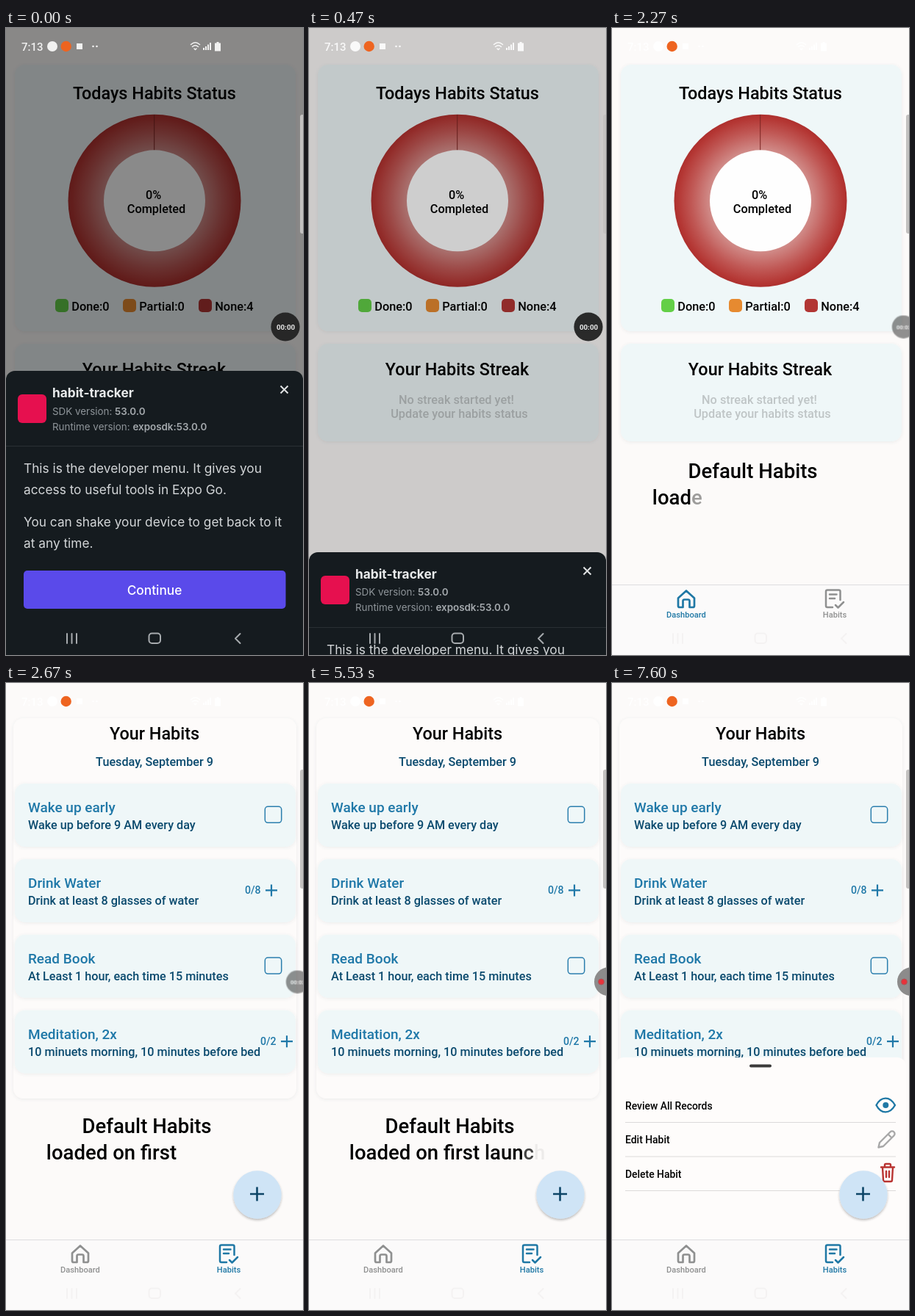
These frames come from a looping animation (404 by 854 pixels, 8 s). An HTML page:

```html
<!DOCTYPE html>
<html lang="en">
<head>
<meta charset="utf-8">
<title>Habit tracker walkthrough</title>
<style>
  html, body { margin: 0; width: 100%; height: 100%; overflow: hidden; background: #fcfaf9; }
  svg { display: block; width: 100%; height: 100%; }
  text { font-family: Roboto, Arial, sans-serif; font-weight: 500; white-space: pre; }
  .mid { text-anchor: middle; }
  .h { font-size: 23.4px; }
  .b { font-size: 16.3px; }
  .cap { font-size: 27.5px; }
  .tab { font-size: 11.1px; text-anchor: middle; fill: currentColor; }
  .opt { font-size: 13.9px; }
  .line { fill: none; stroke: currentColor; stroke-linecap: round; stroke-linejoin: round; }
  .card { fill: #eff7f8; filter: url(#soft); }
  .on { color: #1f78a5; }
  .off { color: #8f9090; }
  .title { font-size: 19px; fill: #1f78a8; }
  .sub { font-size: 16.2px; fill: #0a4a6e; }
  .count { font-size: 14.1px; fill: #1f78a8; }
  #dev text { font-family: Inter, Arial, sans-serif; font-size: 17.3px; font-weight: 400; fill: #d3d6d8; }
  #dev .meta { font-size: 13.4px; fill: #8f959a; }
  #dev .meta tspan { font-weight: 600; fill: #a4a9ad; }

  #dev, #dim, #nav, #menu, #bubble, .touch { animation: 8s linear infinite; }
  #dev { animation-name: dismiss; }
  #dim { animation-name: undim; }
  #nav { animation-name: navfade; }
  #menu { animation-name: rise; }
  #bubble { animation-name: dock; transform-origin: 380px 407px; }
  #tap { animation-name: tap; }
  #hold { animation-name: hold; }

  @keyframes dismiss {
    0%, 3.8% { transform: none; }
    4.125% { transform: translateY(16px); }
    5% { transform: translateY(117.500px); }
    5.875% { transform: translateY(245px); }
    6.625% { transform: translateY(363.500px); }
    7.1%, 100% { transform: translateY(400px); }
  }
  @keyframes undim {
    0%, 3.8% { opacity: .46; }
    5% { opacity: .35; }
    5.875% { opacity: .19; }
    6.625% { opacity: .03; }
    7.5%, 100% { opacity: 0; }
  }
  @keyframes navfade {
    0%, 6.2% { color: #a7abae; }
    6.7% { color: #b9babb; }
    10.8%, 100% { color: #f4f2f2; }
  }
  @keyframes rise {
    0%, 85.6% { transform: translateY(250px); animation-timing-function: cubic-bezier(.2, .7, .3, 1); }
    90.8%, 100% { transform: none; }
  }
  @keyframes dock {
    0%, 17.5% { transform: none; opacity: .97; }
    20%, 100% { transform: translateX(16.5px) scale(.8); opacity: .5; }
  }
  @keyframes tap {
    0%, 2.4% { opacity: 0; }
    3.3%, 5.1% { opacity: .85; }
    5.8%, 100% { opacity: 0; }
  }
  @keyframes hold {
    0%, 82% { opacity: 0; }
    84%, 85.8% { opacity: .6; }
    86.6%, 100% { opacity: 0; }
  }
</style>
</head>
<body>
<svg viewBox="0 0 404 854">
  <defs>
    <radialGradient id="ring" gradientUnits="userSpaceOnUse" cx="202" cy="235.3" r="117.5">
      <stop offset=".58" stop-color="#d18d8a"/>
      <stop offset=".8" stop-color="#c05855"/>
      <stop offset=".96" stop-color="#b43633"/>
      <stop offset="1" stop-color="#ad302e"/>
    </radialGradient>
    <filter id="soft" x="-10%" y="-10%" width="120%" height="125%">
      <feDropShadow dx="0" dy="1" stdDeviation="2" flood-color="#54606a" flood-opacity=".1"/>
    </filter>
    <filter id="lift" x="-20%" y="-20%" width="140%" height="150%">
      <feDropShadow dx="0" dy="2" stdDeviation="1.6" flood-color="#333" flood-opacity=".3"/>
    </filter>
    <g id="home">
      <path class="line" stroke-width="2.7" d="M90 776.5L101 766.5L112 776.5V787a2 2 0 0 1-2 2H105.5V780.5a2 2 0 0 0-2-2h-5a2 2 0 0 0-2 2V789H92a2 2 0 0 1-2-2Z"/>
      <text class="tab" x="101" y="803">Dashboard</text>
    </g>
    <g id="list">
      <path class="line" stroke-width="2.5" d="M300 789H293a2 2 0 0 1-2-2V767.5a2 2 0 0 1 2-2H308.5a2 2 0 0 1 2 2V779M296 771.5H305.5M296 777H303M304 786L307.5 789.5L315 782"/>
      <text class="tab" x="303" y="803">Habits</text>
    </g>
  </defs>

  <rect width="404" height="854" fill="#fcfaf9"/>

  <g id="dash">
    <rect class="card" x="12" y="50" width="382" height="363" rx="14"/>
    <rect class="card" x="12" y="430" width="382" height="133" rx="14"/>
    <text class="h mid" x="202" y="97">Todays Habits Status</text>
    <circle cx="202" cy="235.3" r="117.5" fill="url(#ring)"/>
    <path d="M201.7 118V167" stroke="#7d2523"/>
    <circle cx="202" cy="235.3" r="69" fill="#fefefe"/>
    <text class="b mid" x="200.5" y="233">0%</text>
    <text class="b mid" x="204.5" y="252">Completed</text>
    <g id="legend"></g>
    <text class="h mid" x="201.5" y="473">Your Habits Streak</text>
    <g fill="#bfc5c6">
      <text class="b mid" x="200.5" y="511.5">No streak started yet!</text>
      <text class="b mid" x="204.5" y="530.5">Update your habits status</text>
    </g>
  </g>

  <g id="habits">
    <rect x="10" y="48" width="385" height="518" rx="14" fill="#fdfbfa" filter="url(#soft)"/>
    <text class="h mid" x="202" y="77">Your Habits</text>
    <text class="sub mid" x="202" y="112.5">Tuesday, September 9</text>
    <g id="rows"></g>
  </g>

  <text class="cap mid" x="191.5" y="612.5"></text>
  <text class="cap mid" x="188" y="648.5"></text>

  <g id="menu">
    <path d="M4 770V522a12 12 0 0 1 12-12H388a12 12 0 0 1 12 12V770Z" fill="#fefcfb"/>
    <rect x="187" y="519.5" width="30" height="4" rx="2" fill="#3a3a3a"/>
    <path d="M18 598.5H386M18 645H386M18 691.5H386" stroke="#dcdada"/>
    <text class="opt" x="18" y="580.5">Review All Records</text>
    <text class="opt" x="18" y="627">Edit Habit</text>
    <text class="opt" x="18" y="673.5">Delete Habit</text>
    <g class="on">
      <path class="line" stroke-width="2.4" d="M359.5 575C366 562.5 378 562.5 385 575C378 587.5 366 587.5 359.5 575Z"/>
      <circle cx="372.3" cy="575" r="4" fill="currentColor"/>
    </g>
    <path class="line" color="#a8a8a8" stroke-width="2.4" d="M362.5 632.5L364 626L378.5 611.5a3.5 3.5 0 0 1 5 5L369 631ZM375.5 614.5L380.5 619.5"/>
    <path class="line" color="#b93432" stroke-width="2.4" d="M366 659.5H384M371 659.5V656.5a1.5 1.5 0 0 1 1.5-1.5h5a1.5 1.5 0 0 1 1.5 1.5V659.5M368 660L369 677a2 2 0 0 0 2 2H379a2 2 0 0 0 2-2L382 660M373 665V673M377 665V673"/>
  </g>

  <g id="fab">
    <circle cx="342" cy="697" r="32.7" fill="#cfe4f6" filter="url(#lift)"/>
    <path d="M332 696H351M341.5 686.5V705.5" stroke="#0d4567" stroke-width="2.6"/>
  </g>

  <rect y="758" width="404" height="96" fill="#fbfafa"/>
  <path d="M0 758.5H404" stroke="#dddde0"/>
  <g id="tabA"><use href="#home" class="on"/><use href="#list" class="off"/></g>
  <g id="tabB"><use href="#home" class="off"/><use href="#list" class="on"/></g>

  <rect id="dim" width="404" height="854"/>

  <g id="dev">
    <path d="M0 860V479a12 12 0 0 1 12-12H392a12 12 0 0 1 12 12V860Z" fill="#151b1f"/>
    <path d="M0 569.5H404" stroke="#2b3135"/>
    <rect x="16" y="499" width="39" height="39" rx="6" fill="#e6104f"/>
    <text x="63" y="503" style="font-weight:700;fill:#e9ebec">habit-tracker</text>
    <text class="meta" x="63" y="526.5">SDK version: <tspan>53.0.0</tspan></text>
    <text class="meta" x="63" y="547.5">Runtime version: <tspan>exposdk:53.0.0</tspan></text>
    <path d="M373.5 487.5L383.5 497.5M383.5 487.5L373.5 497.5" stroke="#dfe1e2" stroke-width="2"/>
    <text x="24" y="606">This is the developer menu. It gives you</text>
    <text x="24" y="634.5">access to useful tools in Expo Go.</text>
    <text x="24" y="679">You can shake your device to get back to it</text>
    <text x="24" y="707.5">at any time.</text>
    <rect x="24" y="739" width="356.5" height="52" rx="5" fill="#5a4aea"/>
    <text class="mid" x="202" y="771.5" style="font-weight:500;fill:#fff">Continue</text>
  </g>

  <path id="nav" class="line" stroke-width="2" d="M83 825V838M89.5 825V838M96 825V838M199 824.5h7a4 4 0 0 1 4 4v5.5a4 4 0 0 1-4 4h-7.5a4 4 0 0 1-4-4v-5.5a4 4 0 0 1 4-4ZM318.5 825L312 831.5L318.5 838"/>

  <g fill="#fff" opacity=".88">
    <text x="21" y="30.5" font-size="15">7:13</text>
    <circle cx="63" cy="25" r="7"/>
    <rect x="96" y="21" width="8" height="8"/>
    <circle cx="118.5" cy="25" r="1.3"/>
    <circle cx="123.5" cy="25" r="1.3"/>
    <path class="line" color="#fff" stroke-width="1.5" d="M251.5 22.5Q257.5 17 263.5 22.5M253.5 25.5Q257.5 22 261.5 25.5M256 28L257.5 29.5L259 28"/>
    <path d="M268 30V27h2V30ZM271 30V25h2V30ZM274 30V22.5h2V30ZM277 30V20h2V30ZM284 20.5h2.5V19h3V20.5H292V31.5H284Z"/>
  </g>
  <circle cx="81.7" cy="25" r="7.2" fill="#ee6420"/>

  <path d="M404 118h-1a3 3 0 0 0-3 3V277a3 3 0 0 0 3 3h1Z" fill="#c3c1c0"/>

  <g id="timer">
    <g id="bubble">
      <circle cx="380" cy="407" r="19.6" fill="#252525"/>
      <g id="clock"></g>
    </g>
  </g>
  <g id="rec">
    <circle cx="407.5" cy="406.8" r="19.5" fill="#8c8b8b"/>
    <circle cx="397.5" cy="407" r="4" fill="#e8323a" stroke="#a5595c"/>
  </g>

  <circle id="tap" class="touch" cx="383.5" cy="499" r="10" fill="#d3d5d6" stroke="#bfc1c2"/>
  <circle id="hold" class="touch" cx="80.5" cy="487.5" r="12" fill="#d9dcdd" stroke="#c3c6c7"/>
</svg>

<script>
  const LOOP = 8000, SWAP = 2670, STOP = 4400;
  const $ = id => document.getElementById(id);

  // points: [ms, value] pairs, each ms used once
  function fade(el, prop, points, easing = 'linear') {
    const frames = points.map(([ms, v]) => ({ [prop]: v, offset: ms / LOOP, easing }));
    el.animate(frames, { duration: LOOP, iterations: Infinity });
  }

  // Visible only from one time to another
  function show(el, from, to) {
    const cuts = [0, from, to, LOOP].filter((ms, i, all) => all.indexOf(ms) === i);
    fade(el, 'opacity', cuts.map(ms => [ms, ms >= from && ms < to ? 1 : 0]), 'step-end');
  }

  $('legend').innerHTML = [
    [67, '#63cf47', 'Done:0'], [159, '#e68a30', 'Partial:0'], [262, '#b23634', 'None:4']
  ].map(([x, c, s]) =>
    `<rect x="${x}" y="369" width="18" height="18" rx="5" fill="${c}"/>
     <text class="b" x="${x + 22.3}" y="384.5">${s}</text>`).join('');

  const box = y => `<rect x="352.3" y="${y + 31.3}" width="22.4" height="22" rx="4"
    fill="none" stroke="#2c7fae" stroke-width="1.5"/>`;
  const plus = (x, y, s) => `<text class="count" x="${x}" y="${y + 47.5}">${s}</text>
    <path d="M${x + 28} ${y + 42.5}h16m-8 -8v16" stroke="#1f78a8" stroke-width="2.2"/>`;

  $('rows').innerHTML = [
    ['Wake up early', 'Wake up before 9 AM every day', box],
    ['Drink Water', 'Drink at least 8 glasses of water', y => plus(325, y, '0/8')],
    ['Read Book', 'At Least 1 hour, each time 15 minutes', box],
    ['Meditation, 2x', '10 minuets morning, 10 minutes before bed', y => plus(346, y, '0/2')]
  ].map(([title, sub, control], i) => {
    const y = 137 + i * 102.9;
    return `<rect class="card" x="12" y="${y}" width="382" height="86" rx="14"/>
      <text class="title" x="30" y="${y + 39.2}">${title}</text>
      <text class="sub" x="30" y="${y + 62}">${sub}</text>${control(y)}`;
  }).join('');

  show($('dash'), 0, SWAP);
  show($('tabA'), 0, SWAP);
  ['habits', 'tabB', 'fab'].forEach(id => show($(id), SWAP, LOOP));
  show($('timer'), 0, STOP);
  show($('rec'), STOP, LOOP);

  const ticks = [0, 870, 1800, 2700, 3670, STOP];
  $('clock').innerHTML = ticks.slice(1).map((_, i) =>
    `<text class="mid" x="380.5" y="410.5" font-size="9.8" style="font-weight:700" fill="#ececec">00:0${i}</text>`).join('');
  [...$('clock').children].forEach((el, i) => show(el, ticks[i], ticks[i + 1]));

  // Caption: typed letter by letter, then erased from the end
  const lines = [['Default Habits', 1080, 37], ['loaded on first launch', 2110, 36]];
  const total = lines.reduce((sum, [s]) => sum + s.length, 0);
  let n = 0;
  document.querySelectorAll('.cap').forEach((el, row) => {
    const [str, start, step] = lines[row];
    [...str].forEach((ch, i) => {
      const span = document.createElementNS(el.namespaceURI, 'tspan');
      span.textContent = ch;
      el.append(span);
      const a = start + i * step, b = 5515 + (total - 1 - n++) * 11.3;
      fade(span, 'fillOpacity', [[0, 0], [a, 0], [a + 45, 1], [b, 1], [b + 17, 0], [LOOP, 0]]);
    });
  });

  // One clock for every animation
  const anims = document.getAnimations();
  anims.forEach(a => a.pause());
  const begin = performance.now();
  function tick() {
    const t = (performance.now() - begin) % LOOP;
    anims.forEach(a => { a.currentTime = t; });
    requestAnimationFrame(tick);
  }
  tick();
</script>
</body>
</html>
```
